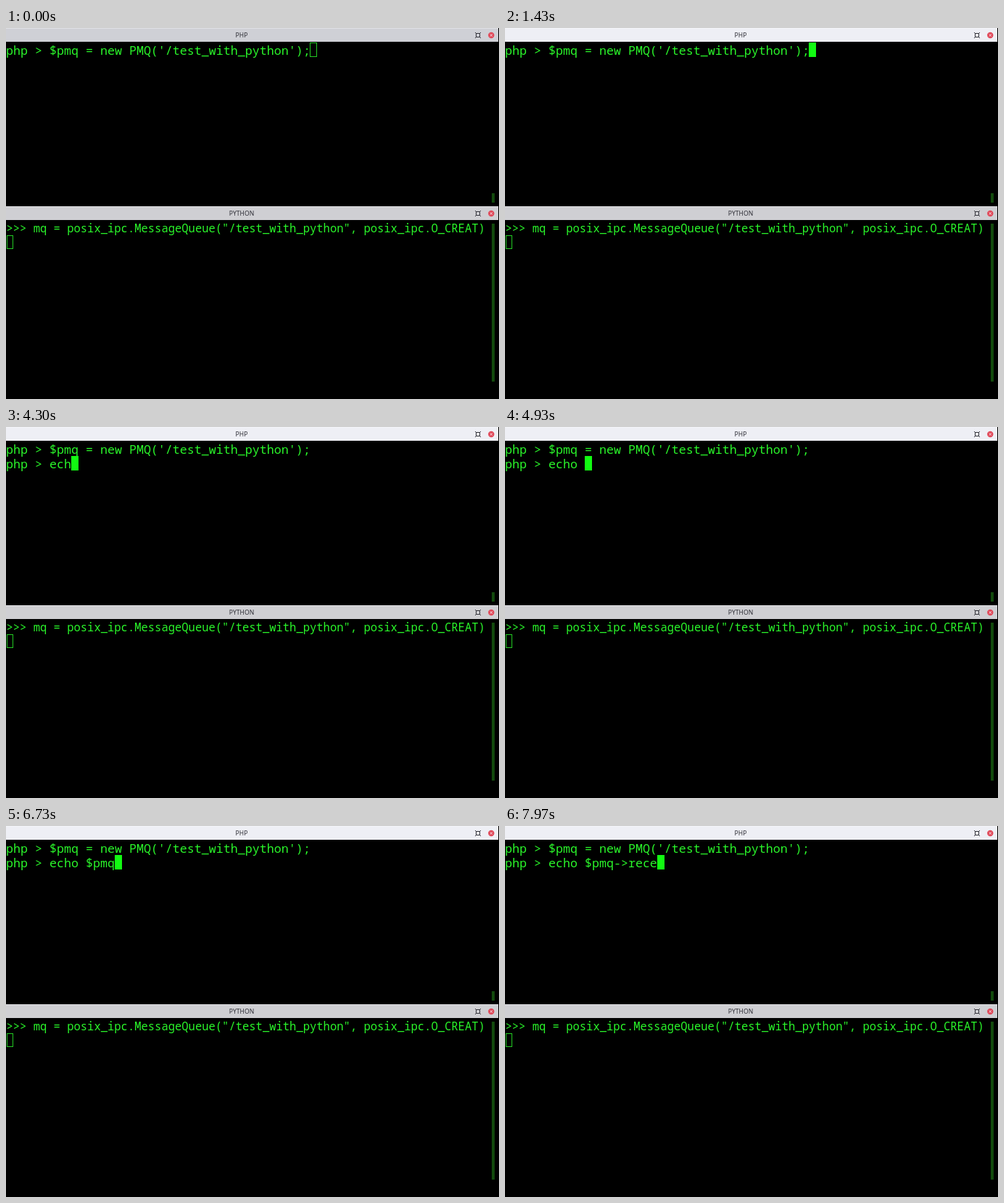
An HTML page with a canvas for the animation above (8 s loop, 680 by 512 pixels).

```html
<!DOCTYPE html>
<html lang="en">
<head>
<meta charset="utf-8">
<title>Two terminals</title>
<style>
  html, body { margin: 0; width: 100%; height: 100%; overflow: hidden; background: #000; }
  canvas { display: block; }
</style>
</head>
<body>
<canvas id="stage" width="680" height="512"></canvas>
<script>
const ctx = document.getElementById('stage').getContext('2d');
const LOOP = 8000, FOCUS = 1000, ENTER = 2730;
const GREEN = '#2af52a', CURSOR = '#12fa12';
const MONO = '"Noto Sans Mono", monospace', SANS = '"Noto Sans", sans-serif';
const PHP_LINE = "php > $pmq = new PMQ('/test_with_python');";
const PYTHON_LINE = '>>> mq = posix_ipc.MessageQueue("/test_with_python", posix_ipc.O_CREAT)';
const TYPED = 'echo $pmq->rece';
// One key press time per typed character
const KEYS = [4030, 4100, 4130, 4330, 4600, 5100, 5230, 5770, 6430, 6770, 7000, 7500, 7570, 7800, 7930];

function rect(x, y, w, h, color) {
  ctx.fillStyle = color;
  ctx.fillRect(x, y, w, h);
}

function text(string, x, y, font, color) {
  ctx.font = font;
  ctx.fillStyle = color;
  ctx.fillText(string, x, y);
}

function hollowCursor(x, y, w, h) {
  ctx.strokeStyle = '#22c822';
  ctx.lineWidth = 1;
  ctx.strokeRect(x + 0.5, y + 0.5, w - 1, h - 1);
}

function titleBar(y, title, color) {
  rect(0, y, 679, 19, color);
  rect(0, y, 679, 1, 'rgba(255,255,255,.35)');
  ctx.textAlign = 'center';
  text(title, 325, y + 13, '8.6px ' + SANS, '#303038');
  ctx.textAlign = 'left';

  // Maximise icon: a small square with ticks at its corners
  ctx.strokeStyle = '#303038';
  ctx.lineWidth = 1;
  ctx.strokeRect(648.5, y + 7.5, 5, 5);
  for (const dx of [-4, 3])
    for (const dy of [-4, 3]) rect(651 + dx, y + 10 + dy, 1, 1, '#303038');

  ctx.fillStyle = '#e04858';
  ctx.beginPath();
  ctx.arc(669.3, y + 10, 4.2, 0, 2 * Math.PI);
  ctx.fill();

  ctx.strokeStyle = '#f4d0d8';
  ctx.beginPath();
  for (const d of [-1.7, 1.7]) {
    ctx.moveTo(669.3 - d, y + 8.3);
    ctx.lineTo(669.3 + d, y + 11.7);
  }
  ctx.stroke();
}

function mix(from, to, amount) {
  return `rgb(${from.map((v, i) => Math.round(v + (to[i] - v) * amount))})`;
}

function draw(t) {
  const focus = Math.min(1, Math.max(0, (t - FOCUS) / 130));
  rect(0, 0, 680, 512, '#000');
  titleBar(0, 'PHP', mix([207, 208, 214], [238, 239, 245], focus));
  titleBar(246, 'PYTHON', 'rgb(207,207,211)');
  rect(670, 228, 4, 13, '#124a0c');
  rect(670, 270, 4, 218, '#124a0c');

  const phpFont = '500 16.667px ' + MONO;
  text(PHP_LINE, 0, 37, phpFont, GREEN);
  if (t < FOCUS) {
    hollowCursor(419, 20, 10, 20);
  } else if (t < ENTER) {
    rect(419, 20, 10, 20, CURSOR);
  } else {
    const count = KEYS.filter(key => key <= t).length;
    text('php > ' + TYPED.slice(0, count), 0, 57, phpFont, GREEN);
    rect(60 + count * 10, 40, 10, 20, CURSOR);
  }

  text(PYTHON_LINE, 0.5, 282, '500 15.5px ' + MONO, GREEN);
  hollowCursor(1, 286, 9, 19);
}

const start = performance.now();
function frame() {
  draw((performance.now() - start) % LOOP);
  requestAnimationFrame(frame);
}
frame();
</script>
</body>
</html>
```
